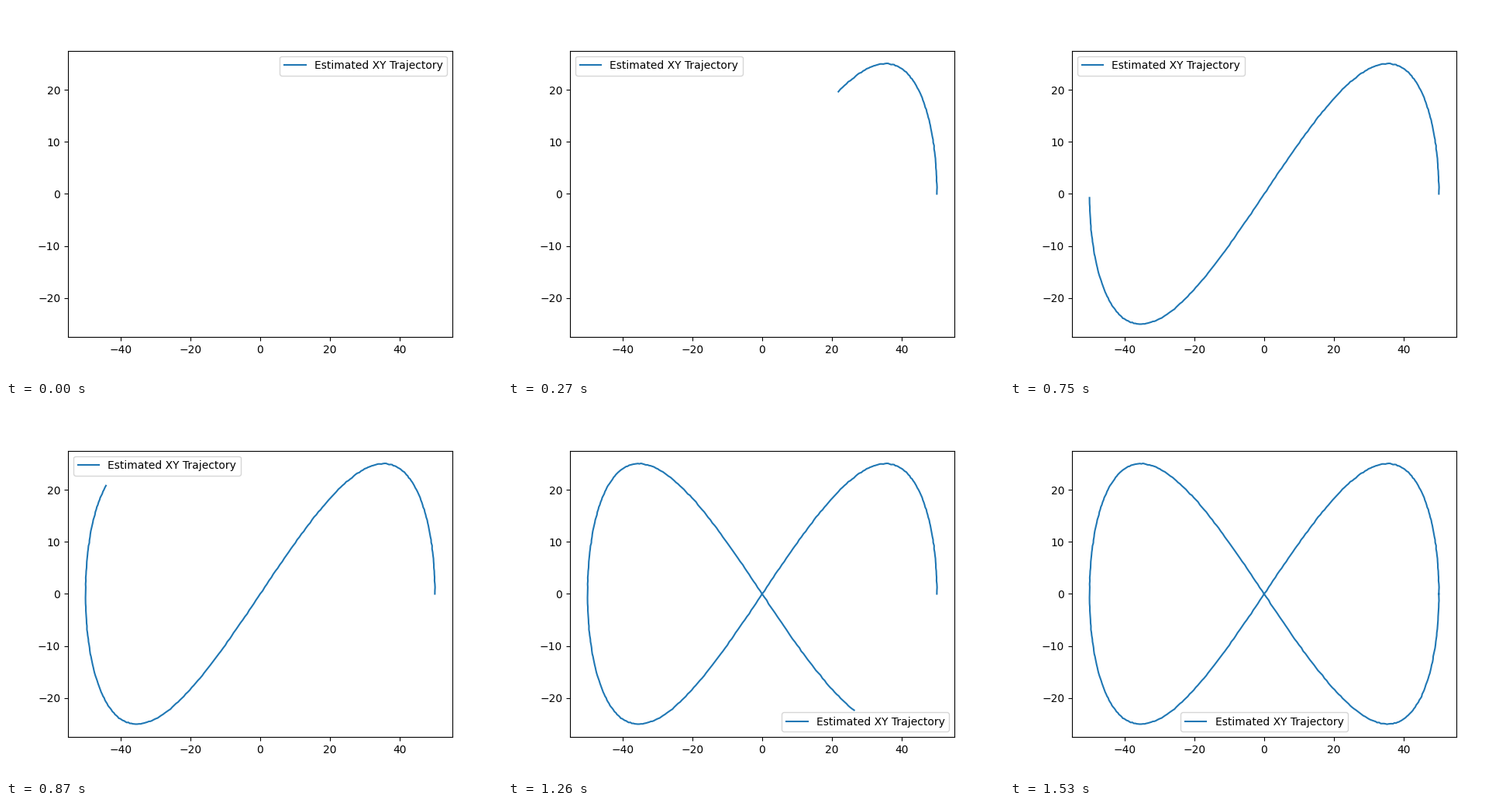
Write a matplotlib script that moves like this. It is 640x480 px and loops after 8000 ms.

```python
import numpy as np
import matplotlib.pyplot as plt
from matplotlib.animation import FuncAnimation

LOOP_MS = 8000
TICK_MS = 20
STEP_MS = 30
POINTS_PER_STEP = 10
LAST_STEP = 51

# Figure-eight path with a slight estimation jitter
rng = np.random.default_rng(4)
t = np.linspace(0, 2 * np.pi, 501)
jitter = rng.normal(0, 0.035, (2, t.size))
x = 50 * np.cos(t) + jitter[0]
y = 25 * np.sin(2 * t) + jitter[1]

fig, ax = plt.subplots(figsize=(6.4, 4.8), dpi=100)
ax.set_xlim(-55, 55)
ax.set_ylim(-27.5, 27.5)
line, = ax.plot([], [], label="Estimated XY Trajectory")
ax.legend(loc="best")  # moves by itself to stay clear of the curve


def update(tick):
    # Sample mid-tick so the 30 ms steps land on the 20 ms grid
    step = min(int((tick + 0.5) * TICK_MS / STEP_MS), LAST_STEP)
    n = step * POINTS_PER_STEP
    line.set_data(x[:n], y[:n])
    return line,


anim = FuncAnimation(fig, update, frames=LOOP_MS // TICK_MS, interval=TICK_MS,
                     repeat=True, repeat_delay=0, blit=False)
plt.show()
```
